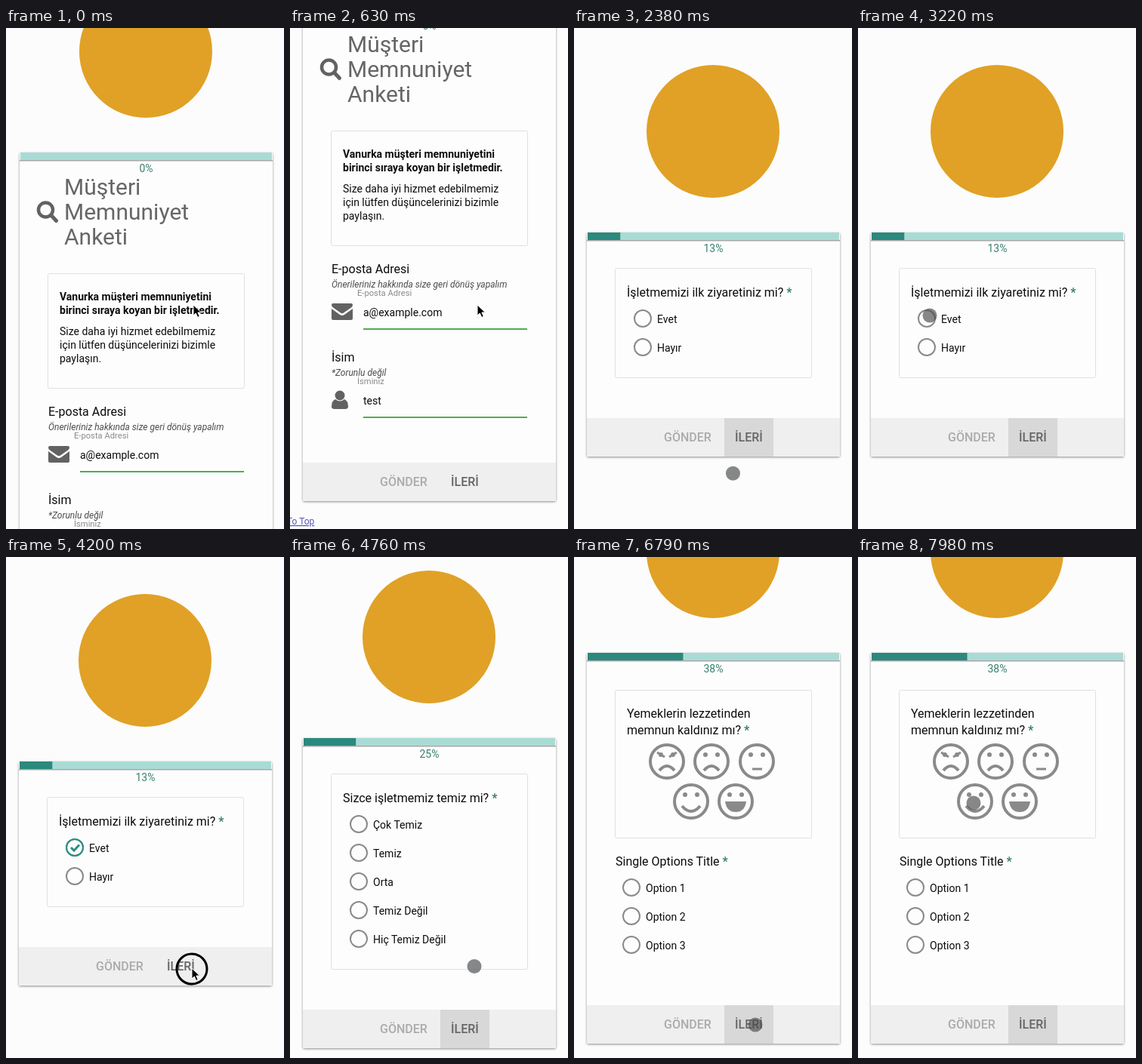
An HTML page that plays this animation: 368 px wide and 664 px high, repeating every 8 s.

```html
<!DOCTYPE html>
<html lang="tr">
<head>
<meta charset="utf-8">
<title>Müşteri Memnuniyet Anketi</title>
<style>
  html, body { margin: 0; width: 100%; height: 100%; overflow: hidden; background: #fcfcfc; }
  svg { display: block; width: 368px; height: 664px; font: 14px Roboto, sans-serif; fill: #0c0c0c; }
  .card { fill: #fdfdfd; filter: drop-shadow(0 1px 1.5px rgba(0, 0, 0, .45)); }
  .box { fill: none; stroke: #e0e0e6; }
  .title { font-size: 30px; fill: #666; }
  .head { font-size: 16px; }
  .bold { font-weight: 700; }
  .note { font-size: 12px; font-style: italic; fill: #4c4c4c; }
  .hint { font-size: 11.2px; fill: #8a8a8a; }
  .button { font-size: 16px; font-weight: 500; fill: #646464; }
  .off { fill: #ababab; }
  .accent { fill: #38806f; }
  .percent { text-anchor: middle; }
  .icon { fill: #626262; }
  .line { fill: none; stroke: #8a8a8a; stroke-width: 2; }
  .on { stroke: #2a9083; }
  .face { fill: none; stroke: #8a8a8a; stroke-width: 4; }
  .solid { fill: #8a8a8a; stroke: none; }
  .link { font-size: 12px; fill: #5555b0; text-decoration: underline; }
</style>
</head>
<body>
<svg id="stage" viewBox="0 0 368 664"></svg>
<script>
const LOOP = 8000, STEP = 70, BAR = 271, BAR_WIDTH = 333;
const percents = [0, 13, 25, 38];
const swaps = [0, 1850, 4550, 6450];
const ticks = [0, 3500, 5900];              // when a radio answer is chosen on each page
const clicks = [1470, 3500, 4200, 5900, 6350];

const text = (x, y, s, cls = '') => `<text x="${x}" y="${y}" class="${cls}">${s}</text>`;
const rect = (x, y, w, h, attrs) => `<rect x="${x}" y="${y}" width="${w}" height="${h}" ${attrs}/>`;
const circle = (x, y, r, attrs) => `<circle cx="${x}" cy="${y}" r="${r}" ${attrs}/>`;
const path = (d, attrs) => `<path d="${d}" ${attrs}/>`;
const star = ' <tspan class="accent bold">*</tspan>';
const box = (y, h) => rect(54.5, y + .5, 260, h, 'class="box" rx="2"');

function radio(x, y, label, checkable) {
  const mark = checkable
    ? `<g class="tick">${circle(x, y, 11, 'class="line on"')}${path(`M${x - 5} ${y}l4 4 7-7.5`, 'class="line on" style="stroke-width:3"')}</g>`
    : '';
  return circle(x, y, 11, 'class="line"') + mark + text(x + 19, y + 5.5, label);
}

function face(x, y, features) {
  const eyes = circle(-8, -9, 3, 'class="solid"') + circle(8, -9, 3, 'class="solid"');
  return `<g class="face" transform="translate(${x} ${y})">${circle(0, 0, 22, '')}${eyes}${features}</g>`;
}

function field(y, label, note, hint, value) {
  return text(55, y, label, 'head') + text(55, y + 19, note, 'note') + text(89, y + 30, hint, 'hint') +
    text(97, y + 57, value) + rect(97, y + 73, 217, 2, 'fill="#4caf50"');
}

function page(index, footer, body) {
  return `<g class="page">
    ${rect(17, BAR, 335, footer + 51 - BAR, 'class="card" rx="2"')}
    ${rect(17, footer, 335, 51, 'fill="#efefef"')}
    ${rect(199, footer, 65, 51, 'class="focus" fill="#d8d8d9"')}
    ${text(119, footer + 31, 'GÖNDER', 'button off')}${text(213, footer + 31, 'İLERİ', 'button')}
    ${rect(17, BAR + 10, 335, 1.5, 'fill="#a8a8a8"')}
    ${rect(18, BAR, BAR_WIDTH, 10, 'fill="#a9dbd5"')}${rect(18, BAR, 0, 10, 'class="fill" fill="#2b897d"')}
    ${text(184.5, 297, percents[index] + '%', 'percent accent')}${body}</g>`;
}

const intro =
  circle(51.5, 347, 9.5, 'fill="none" stroke="#626262" stroke-width="4.5"') +
  path('M58.5 354l7 7.5', 'stroke="#626262" stroke-width="5" stroke-linecap="round"') +
  ['Müşteri', 'Memnuniyet', 'Anketi'].map((s, i) => text(76, 327 + 33 * i, s, 'title')).join('') +
  box(431, 152) +
  text(70, 467, 'Vanurka müşteri memnuniyetini', 'bold') +
  text(70, 485, 'birinci sıraya koyan bir işletmedir.', 'bold') +
  ['Size daha iyi hizmet edebilmemiz', 'için lütfen düşüncelerinizi bizimle', 'paylaşın.']
    .map((s, i) => text(70, 513 + 18 * i, s)).join('') +
  field(620, 'E-posta Adresi', 'Önerileriniz hakkında size geri dönüş yapalım', 'E-posta Adresi', 'a@example.com') +
  path('M55 662q0-2 2-2h24q2 0 2 2 0 2-2 3.5l-10 7q-2 1.5-4 0l-10-7q-2-1.5-2-3.5zM55 667l11 8q3 2 6 0l11-8v13q0 2-2 2h-24q-2 0-2-2z', 'class="icon"') +
  field(737, 'İsim', '*Zorunlu değil', 'İsminiz', 'test') +
  circle(66, 782, 6.5, 'class="icon"') +
  path('M60 787q6 5 12 0 5 2 5 10 0 3-4 3H59q-4 0-4-3 0-8 5-10z', 'class="icon"') +
  text(-4, 953, 'To Top', 'link');

const firstVisit = box(318, 145) + text(70, 356, 'İşletmemizi ilk ziyaretiniz mi?' + star, 'head') +
  ['Evet', 'Hayır'].map((s, i) => radio(91, 385 + 38 * i, s, !i)).join('');

const cleanliness = box(318, 259) + text(70, 356, 'Sizce işletmemiz temiz mi?' + star, 'head') +
  ['Çok Temiz', 'Temiz', 'Orta', 'Temiz Değil', 'Hiç Temiz Değil']
    .map((s, i) => radio(91, 385 + 38 * i, s, !i)).join('');

const frown = path('M-10 12q10-12 20 0', '');
const taste = box(320, 196) + text(70, 357, 'Yemeklerin lezzetinden', 'head') +
  text(70, 379, 'memnun kaldınız mı?' + star, 'head') +
  face(123, 415, frown + path('M-13-12l10 6M13-12l-10 6', 'stroke-width="3"')) +
  face(182, 415, frown) +
  face(242, 415, path('M-6 10h13', 'stroke-width="3"')) +
  face(155, 468, path('M-12 6q12 14 24 0', '')) +
  face(214, 468, path('M-14 0h28q-2 14-14 14t-14-14z', 'class="solid"')) +
  text(55, 553, 'Single Options Title' + star, 'head') +
  [1, 2, 3].map(n => radio(76, 544 + 38 * n, 'Option ' + n)).join('');

const stage = document.getElementById('stage');
stage.innerHTML = `<g id="doc">${circle(184, 137, 88, 'fill="#e0a126"')}
  ${page(0, 871, intro)}${page(1, 517, firstVisit)}${page(2, 631, cleanliness)}${page(3, 738, taste)}</g>
  <g id="pointer">${circle(0, 0, 9.5, 'id="dot" fill="#484a4c" opacity=".66"')}
  ${circle(0, 1, 20, 'id="ring" fill="none" stroke="#000" stroke-width="3"')}
  ${path('M0 0V14l3.3-3 2.4 5.4 2.6-1.1-2.4-5.3h4.6z', 'id="arrow" fill="#000" stroke="#fff"')}</g>`;

const [doc, pointer, dot, ring, arrow] = ['doc', 'pointer', 'dot', 'ring', 'arrow'].map(id => document.getElementById(id));
const pages = [...document.querySelectorAll('.page')];

const scrollKeys = [[0, 106], [490, 295], [840, 295], [1190, 265], [1850, 265], [1850, 0],
  [4550, 0], [4830, 37], [6450, 37], [6700, 144], [LOOP, 144]];
const pointerKeys = [[0, 248, 367], [700, 248, 367], [1330, 239, 642], [2100, 239, 642], [3080, 95, 381],
  [3560, 95, 381], [4060, 246, 545], [4700, 246, 545], [5600, 89, 354], [5970, 89, 354],
  [6280, 240, 620], [6900, 240, 620], [7800, 153, 326], [LOOP, 153, 326]];

const clamp = x => Math.max(0, Math.min(1, x));
const ease = x => x * x * (3 - 2 * x);

function along(keys, t) {
  const next = keys.findIndex(k => t < k[0]);
  const from = keys[next - 1], to = keys[next];
  const p = ease((t - from[0]) / (to[0] - from[0]));
  return from.slice(1).map((v, i) => v + (to[i + 1] - v) * p);
}

const show = (el, visible) => { el.style.display = visible ? '' : 'none'; };

function render(t) {
  const [scroll] = along(scrollKeys, t);
  doc.setAttribute('transform', `translate(${t < 210 ? 1 : 0} ${-Math.round(scroll)})`);

  const current = swaps.findLastIndex(s => t >= s);
  pages.forEach((el, i) => {
    show(el, i === current);
    if (i !== current) return;
    const age = t - swaps[i];
    el.style.opacity = i ? clamp(.3 + age / 200) : 1;
    const before = percents[Math.max(0, i - 1)];
    const progress = before + (percents[i] - before) * ease(clamp(age / 350));
    el.querySelector('.fill').setAttribute('width', BAR_WIDTH * progress / 100);
    const chosen = i > 0 && i < 3 && t >= ticks[i];
    show(el.querySelector('.focus'), i ? !chosen : t > 1680);
    const tick = el.querySelector('.tick');
    if (tick) show(tick, chosen);
  });

  const [x, y] = along(pointerKeys, t);
  const pressing = clicks.some(c => t >= c - 70 && t < c + 210);
  const arrowShown = pressing || t < swaps[1];
  pointer.setAttribute('transform', `translate(${x} ${y})`);
  show(ring, pressing);
  show(arrow, arrowShown);
  show(dot, !arrowShown);
}

const start = performance.now();
function frame() {
  const t = (performance.now() - start) % LOOP;
  render(Math.floor(t / STEP) * STEP);
  requestAnimationFrame(frame);
}
frame();
</script>
</body>
</html>
```
